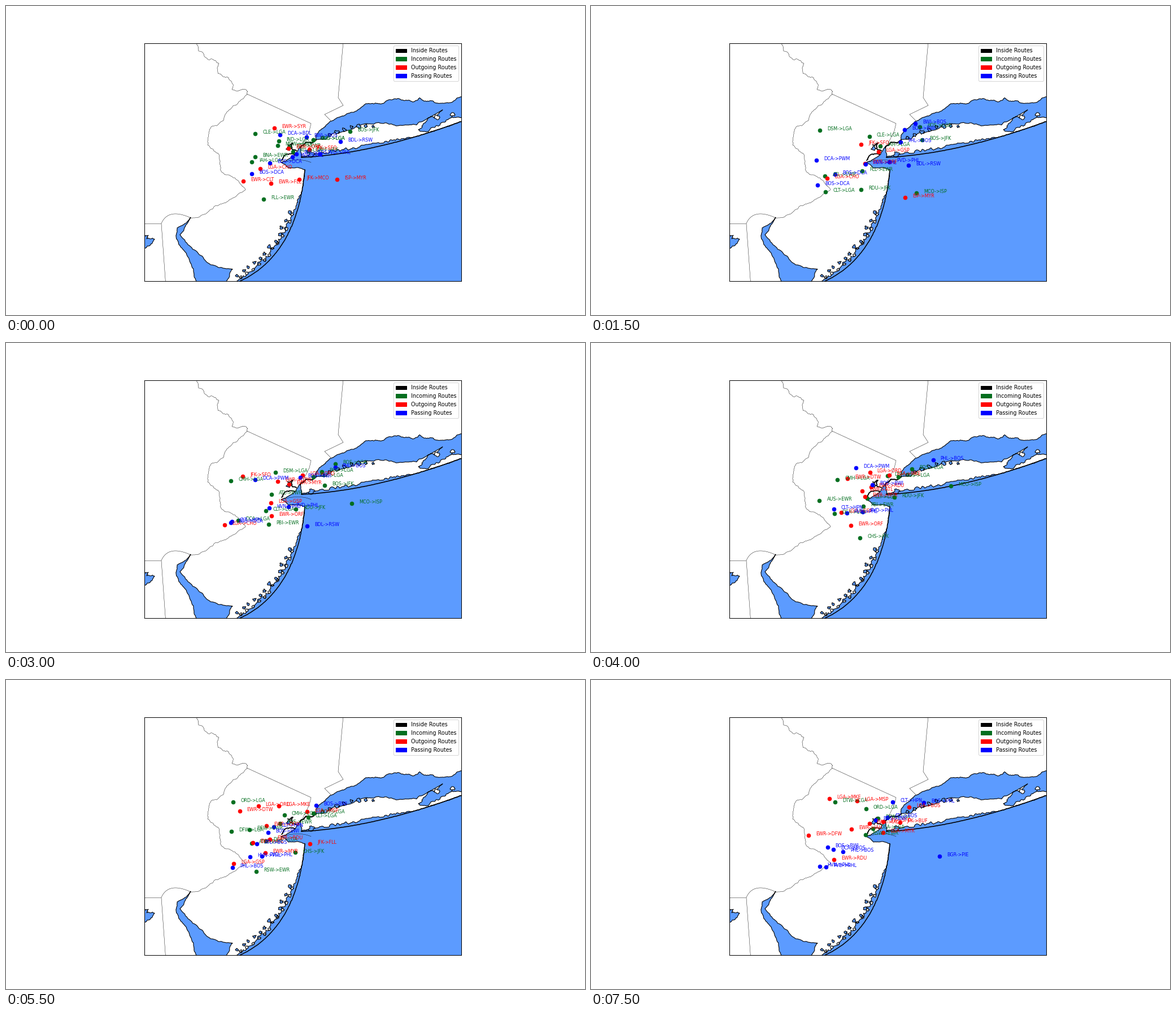
These frames come from a looping animation (1025 by 547 pixels, 8 s). A matplotlib script:

```python
import numpy as np
import matplotlib.pyplot as plt
from matplotlib.animation import FuncAnimation
from matplotlib.patches import Patch, Polygon

W, H, DPI = 1025, 547, 72
FRAMES, STEP = 16, 500
WATER, GREEN = "#5c9bff", "#036e1f"

# The map spans 4 by 3 degrees, drawn in stage pixels
WEST, SOUTH = -76, 39
TOP, BOTTOM = .12 * H, .89 * H
SCALE = (BOTTOM - TOP) / 3
LEFT = .5125 * W - 2 * SCALE
RIGHT = LEFT + 4 * SCALE

# Flights are shown only inside this patch of airspace
LON_RANGE, LAT_RANGE = (-75, -73), (40, 41)

AIRPORTS = dict(
    EWR=(40.69, -74.17), LGA=(40.78, -73.87), JFK=(40.64, -73.78), ISP=(40.8, -73.1),
    BOS=(42.4, -71), PHL=(39.9, -75.2), DCA=(38.9, -77), BWI=(39.2, -76.7),
    HVN=(41.3, -72.9), PVD=(41.7, -71.4), BDL=(41.9, -72.7), PWM=(43.7, -70.3),
    HPN=(41.1, -73.7), BGR=(44.8, -68.8), MHT=(42.9, -71.4), BTV=(44.5, -73.2),
    SYR=(43.1, -76.1), BUF=(42.9, -78.7), CLE=(41.4, -81.9), DTW=(42.2, -83.4),
    CMH=(40, -82.9), IND=(39.7, -86.3), ORD=(42, -87.9), MDW=(41.8, -87.8),
    MKE=(43, -87.9), MSP=(44.9, -93.2), DSM=(41.5, -93.7), BNA=(36.1, -86.7),
    SFO=(37.6, -122.4), DFW=(32.9, -97), IAH=(30, -95.3), AUS=(30.2, -97.7),
    ATL=(33.6, -84.4), CLT=(35.2, -80.9), GSP=(34.9, -82.2), RDU=(35.9, -78.8),
    ORF=(36.9, -76.2), CHO=(38.1, -78.5), MYR=(33.7, -78.9), CHS=(32.9, -80),
    MCO=(28.4, -81.3), PBI=(26.7, -80.1), FLL=(26.1, -80.2), RSW=(26.5, -81.8),
    PIE=(27.9, -82.7), IAD=(39, -77.5))

# Timetables: city and step of landing or take-off
ARRIVALS = dict(
    LGA="ORD 0 BOS 0 ATL 1.9 IND 2.8 IAH 4.2 CLE 6 BOS 8 DSM 8.8 BOS 11.1 CLT 11.6 "
        "CMH 13.7 DFW 16.3 ORD 17.7 DCA 19.6 DTW 21.3",
    EWR="BTV 0 MDW 1 BNA 2.75 FLL 5.6 ATL 7.7 PBI 10.4 AUS 11.6 DFW 13.6 ATL 14.6 RSW 16.5",
    JFK="CMH 1.1 BOS 7 RDU 9.6 CHS 14.7",
    ISP="MCO 9.2")
DEPARTURES = dict(
    EWR="CLT -6.9 SYR -5.5 FLL -4.4 ORF -.3 DTW 4.5 MYR 6 ATL 6.5 RDU 7.4 DFW 8.9 "
        "IAH 12.8 IAD 14",
    LGA="CHO -8.9 GSP .4 ORD 4.8 MKE 7 MSP 10.3 MYR 12 BOS 12.8",
    JFK="MCO -3.8 SFO -1 FLL 8.7 SFO 13 BUF 14",
    ISP="MYR -6.7")
# Overflights: step of crossing the 74th meridian
PASSING = ("BOS->DCA -7.9 BOS->DCA -5.1 HVN->PHL -2.7 BWI->BOS -.5 PHL->BOS 1 PVD->PHL 3.3 "
           "DCA->BDL 3.5 BOS->BWI 5.6 BDL->RSW 6.8 DCA->PWM 12 BOS->BWI 13.1 CLT->HPN 14.4 "
           "ATL->BOS 15 BOS->PHL 21.6 DCA->BOS 21.8 PHL->BOS 22 BGR->PIE 22.5 MHT->MCO 28.3")

rng = np.random.default_rng(7)


def parse(table):
    words = table.split()
    return zip(words[::2], map(float, words[1::2]))


def great_circle(a, b, p):
    """Latitude and longitude after the share p of the way from a to b."""
    def unit(lat, lon):
        return np.array([np.cos(lat) * np.cos(lon), np.cos(lat) * np.sin(lon), np.sin(lat)])
    u, v = unit(*np.radians(a)), unit(*np.radians(b))
    arc = np.arccos(u @ v)
    x, y, z = (np.outer(u, np.sin((1 - p) * arc)) + np.outer(v, np.sin(p * arc))) / np.sin(arc)
    return np.degrees(np.arcsin(z)), np.degrees(np.arctan2(y, x))


def duration(a, b):
    """Steps in the air: a fixed share plus distance, slower against the wind."""
    north = b[0] - a[0]
    east = (b[1] - a[1]) * np.cos(np.radians(a[0] + b[0]) / 2)
    dist = np.hypot(north, east)
    e, n = east / dist, north / dist
    return 31 + dist * (7 - 1.5 * e - 1.8 * e * n)


class Flight:
    def __init__(self, route, color, step, kind):
        self.a, self.b = (AIRPORTS[code] for code in route.split("->"))
        self.length = duration(self.a, self.b)
        share = {"out": 0, "in": 1}.get(kind)
        if share is None:
            p = np.linspace(0, 1, 2000)
            share = p[np.abs(great_circle(self.a, self.b, p)[1] + 74).argmin()]
        self.start = step - share * self.length
        self.dot, = ax.plot([], [], "o", color=color, ms=6.6, mew=1, zorder=2)
        self.tag = ax.text(0, 0, route, color=color, fontsize=8, zorder=3)

    def show(self, step):
        p = (step - self.start) / self.length
        lat, lon = (v.item() for v in great_circle(self.a, self.b, np.array([p])))
        x, y = LEFT + (lon - WEST) * SCALE, BOTTOM - (lat - SOUTH) * SCALE
        shown = (-1e-6 <= p <= 1 + 1e-6 and LON_RANGE[0] <= lon <= LON_RANGE[1]
                 and LAT_RANGE[0] <= lat <= LAT_RANGE[1])
        self.dot.set_data([x], [y])
        self.tag.set_position((x + 13.2, y))
        self.dot.set_visible(shown)
        self.tag.set_visible(shown)


def rough(points, amp, finest=2.5):
    """Break a polyline into a jagged one by midpoint displacement."""
    pts = np.array(points, float)
    while np.hypot(*np.diff(pts, axis=0).T).max() > finest:
        seg = np.diff(pts, axis=0)
        normal = np.column_stack([-seg[:, 1], seg[:, 0]])
        out = np.empty((2 * len(pts) - 1, 2))
        out[::2] = pts
        out[1::2] = pts[:-1] + seg / 2 + normal * rng.normal(0, amp, (len(seg), 1))
        pts = out
    return pts


def bezier(a, b, c, n=70):
    t = np.linspace(0, 1, n)[:, None]
    return (1 - t) ** 2 * np.array(a) + 2 * t * (1 - t) * np.array(b) + t ** 2 * np.array(c)


def lagoon_shore(beach, width, span):
    """Shore behind a barrier beach, at a wavering distance along its first part."""
    t = np.linspace(0, 1, len(beach))
    gap = width * np.sqrt(np.maximum(0, np.sin(np.pi * np.minimum(t / span, 1))))
    gap *= rng.uniform(.5, 1.3, len(t))
    tangent = np.gradient(beach, axis=0)
    tangent /= np.hypot(*tangent.T)[:, None]
    return beach + gap[:, None] * np.column_stack([tangent[:, 1], -tangent[:, 0]])


def area(points, color=WATER, lw=1.1):
    ax.add_patch(Polygon(points, facecolor=color, edgecolor="black", lw=lw,
                         joinstyle="round", zorder=1))


def blob(x, y, r, color="white"):
    a = np.linspace(0, 2 * np.pi, 12)
    d = r * rng.uniform(.4, 1.3, 12)
    area(np.column_stack([x + d * np.cos(a), y + d * np.sin(a)]), color)


def line(points, amp=.1, lw=1.2):
    ax.plot(*rough(points, amp).T, color="black", lw=lw, zorder=1.2)


def border(points, amp=0):
    line(points, amp, .45)


def draw_map():
    jersey = bezier((408, 490), (515, 444), (529, 290))
    island = bezier((523, 268), (650, 262), (810, 203))

    harbour = [(529, 290), (517, 286), (487, 277), (509, 266), (521, 249), (523, 268)]
    area(np.vstack([rough(lagoon_shore(jersey, 10, .85), .12), rough(harbour, .07),
                    rough(lagoon_shore(island, 7, .7), .1), [(810, 490)]]))

    # Sound, with the forks at its east end
    mainland = [(549, 229), (575, 204), (605, 190), (645, 173), (678, 166), (750, 168),
                (810, 158)]
    forks = [(810, 197), (772, 206), (730, 219), (757, 197), (773, 184)]
    north_shore = [(738, 204), (690, 212), (620, 213), (580, 225), (549, 237), (549, 229)]
    area(np.vstack([rough(mainland, .09), rough(forks, .12), rough(north_shore, .07)]))
    blob(763, 197, 5)
    blob(790, 192, 4)
    for x in np.linspace(560, 650, 8):
        y = 237 - 24 * min(1, (x - 549) / 65)
        blob(x, y, rng.uniform(2, 4), WATER)

    # Barrier beaches and the marsh islands behind the southern one
    line(jersey, .05, 1.5)
    line(island, .03, 1.6)
    for x, y in jersey[4:52:4]:
        blob(x - rng.uniform(4, 8), y - rng.uniform(3, 6), 2.6)
        blob(x - rng.uniform(9, 14), y - rng.uniform(6, 10), 3, WATER)

    # Inner harbour
    blob(500, 252, 4, WATER)
    blob(541, 263, 5, WATER)
    line([(488, 273), (498, 262), (511, 263)], .15, 1.8)
    line([(499, 246), (508, 243), (506, 253), (514, 256)], .15, 1.8)
    line([(521, 251), (531, 241), (549, 237)], .13, 2)

    # Delaware Bay and the head of the Chesapeake
    area(rough([(327, 374), (303, 393), (301, 406), (311, 428), (328, 457), (337, 490),
                (388, 490), (401, 466), (362, 458), (337, 434), (308, 405), (318, 388),
                (327, 374)], .06))
    area(rough([(240, 404), (252, 406), (249, 412), (263, 413), (240, 426)], .15))

    # State lines
    border([(427, 156), (388, 192), (385, 203), (360, 219), (357, 246), (378, 272),
            (380, 290), (406, 305), (424, 325), (370, 354), (327, 375)], .09)
    border([(427, 156), (425, 148), (400, 147), (375, 119), (377, 102), (352, 90),
            (337, 64)], .12)
    border([(427, 156), (540, 208), (537, 221), (522, 251)])
    border([(597, 64), (588, 162), (597, 176), (564, 192), (575, 203)])
    border([(240, 385.5), (275, 385.5), (282.5, 490)])
    border(bezier((275, 385), (287, 357), (327, 375)))
    border(bezier((487, 277), (520, 268), (540, 277)))


def make_flights():
    out = []
    for port, table in ARRIVALS.items():
        out += [Flight(f"{city}->{port}", GREEN, t, "in") for city, t in parse(table)]
    for port, table in DEPARTURES.items():
        out += [Flight(f"{port}->{city}", "red", t, "out") for city, t in parse(table)]
    out += [Flight(route, "blue", t, "over") for route, t in parse(PASSING)]
    return out


fig = plt.figure(figsize=((W + .01) / DPI, (H + .01) / DPI), dpi=DPI, facecolor="white")
ax = fig.add_axes([LEFT / W, 1 - BOTTOM / H, (RIGHT - LEFT) / W, (BOTTOM - TOP) / H])
ax.set(xlim=(LEFT, RIGHT), ylim=(BOTTOM, TOP), xticks=[], yticks=[])
for spine in ax.spines.values():
    spine.set(linewidth=1, zorder=4)

draw_map()
flights = make_flights()
kinds = {"Inside": "black", "Incoming": GREEN, "Outgoing": "red", "Passing": "blue"}
ax.legend(handles=[Patch(color=c, label=f"{name} Routes") for name, c in kinds.items()],
          loc="upper right", fontsize=9.6)


def update(step):
    for flight in flights:
        flight.show(step)
    return []


def init():
    return update(0)


anim = FuncAnimation(fig, update, frames=FRAMES, init_func=init,
                     interval=STEP, repeat=True, repeat_delay=0, blit=False)
plt.show()
```
